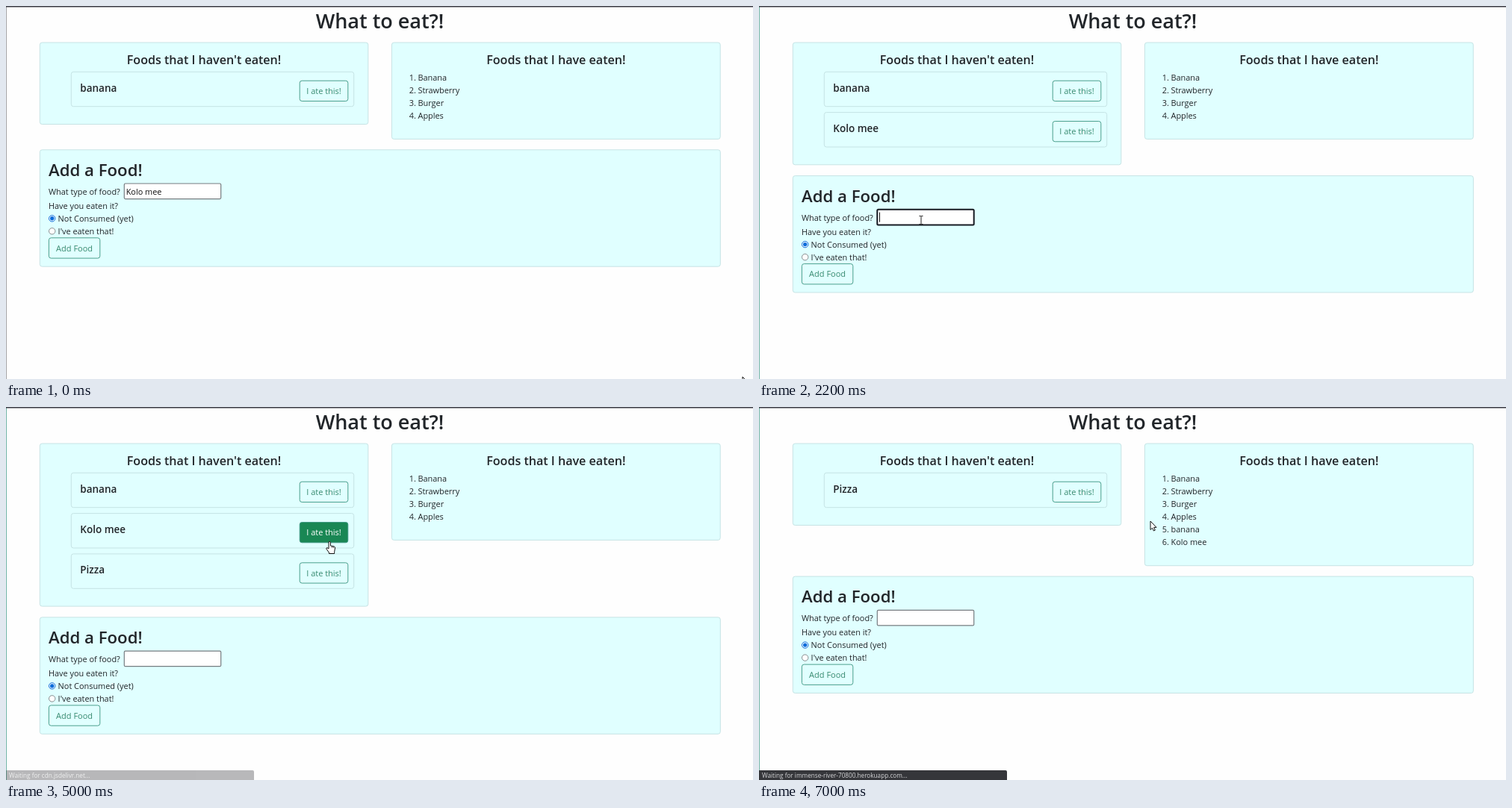
Animation, 1000 px wide and 500 px high, one loop 7.1 s. Source, as an HTML page:

```html
<!DOCTYPE html>
<html lang="en">
<head>
<meta charset="utf-8">
<title>What to eat?!</title>
<style>
  html, body { margin: 0; width: 100%; height: 100%; overflow: hidden; background: #fefefe; }
  svg { display: block; width: 1000px; height: 500px; font-family: "Open Sans", "Noto Sans", sans-serif; cursor: default; }
</style>
</head>
<body>
<svg id="stage" viewBox="0 0 1000 500"></svg>
<script>
const LOOP = 7100, STEP = 100;
const INK = '#212529', GREEN = '#198754', CARD = '#e0ffff', EDGE = '#c2e0e1';
const BODY = 10.9, ITEM_STEP = 54.3, LINE = 17.15;
const stage = document.getElementById('stage');
const ruler = document.createElement('canvas').getContext('2d');
ruler.font = `${BODY}px "Open Sans", "Noto Sans", sans-serif`;

// Each page the server returns, from its start time
const pages = [
  { from: 0, todo: ['banana'], done: [] },
  { from: 1300, todo: ['banana', 'Kolo mee'], done: [] },
  { from: 4800, todo: ['banana', 'Kolo mee', 'Pizza'], done: [] },
  { from: 5500, todo: ['banana', 'Pizza'], done: ['Kolo mee'] },
  { from: 6600, todo: ['Pizza'], done: ['banana', 'Kolo mee'] }
];
const eaten = ['Banana', 'Strawberry', 'Burger', 'Apples'];

// Pointer stops: time, x, y
const stops = [
  [0, 986, 497], [800, 93, 326], [1000, 93, 326], [1600, 218, 254],
  [2100, 217, 287], [3700, 217, 287], [4000, 96, 362], [4200, 96, 362],
  [4500, 410, 181], [4700, 433, 180], [5300, 433, 180], [5700, 512, 121],
  [5800, 512, 121], [6200, 428, 117], [6400, 428, 117], [6900, 524, 153], [LOOP, 524, 153]
];

const HOST = 'immense-river-70800.herokuapp.com', CDN = 'cdn.jsdelivr.net';
// Status bar: start, end, host, opacity
const statuses = [
  [1000, 1900, HOST, 1], [1900, 2100, CDN, 1], [2100, 2200, CDN, .35],
  [4600, 4900, HOST, 1], [4900, 5000, CDN, 1], [5000, 5100, CDN, .35],
  [5300, 5900, HOST, 1], [5900, 6000, CDN, 1], [6000, 6100, CDN, .35],
  [6400, LOOP, HOST, 1]
];

const text = (x, y, str, size = BODY, weight = 400, fill = INK, anchor = 'start') =>
  `<text x="${x}" y="${y}" font-size="${size}" font-weight="${weight}" fill="${fill}" text-anchor="${anchor}">${str}</text>`;
const box = (x, y, w, h, fill, stroke, line = .9, r = 3) =>
  `<rect x="${x}" y="${y}" width="${w}" height="${h}" rx="${r}" fill="${fill}" stroke="${stroke}" stroke-width="${line}"/>`;
const card = (x, y, w, h) => box(x, y, w, h, CARD, EDGE);
const inside = (p, x, y, w, h) => p.x >= x && p.x <= x + w && p.y >= y && p.y <= y + h;

function pointerAt(t) {
  const i = stops.findIndex(s => s[0] > t);
  const [t0, x0, y0] = stops[i - 1], [t1, x1, y1] = stops[i];
  const u = (t - t0) / (t1 - t0), k = u * u * (3 - 2 * u);
  return { x: x0 + (x1 - x0) * k, y: y0 + (y1 - y0) * k, kind: 'arrow' };
}

function button(p, x, y, w, label, focused) {
  const hover = inside(p, x, y, w, 26);
  if (hover) p.kind = 'hand';
  return (focused ? box(x - 1.5, y - 1.5, w + 3, 30.3, 'none', '#7fc0a4', 3.4, 4) : '') +
    box(x, y, w, 27.3, hover ? GREEN : CARD, focused ? '#146c50' : '#3c9580') +
    text(x + w / 2, y + 17.7, label, 11, 400, hover ? '#fff' : '#388a70', 'middle');
}

function radio(y, label, checked) {
  return `<circle cx="61.7" cy="${y}" r="4.2" fill="#fff" stroke="${checked ? '#0b6ddb' : '#858b8d'}"/>` +
    (checked ? `<circle cx="61.7" cy="${y}" r="2.7" fill="#0b6ddb"/>` : '') +
    text(69.6, y + 4.2, label);
}

function typed(t) {
  if (t < 1300) return 'Kolo mee';
  if (t < 3000 || t >= 4800) return '';
  return 'Pizza'.slice(0, [1, 2, 2, 3, 4][(t - 3000) / STEP] || 5);
}

function form(t, p, top) {
  const value = typed(t), focused = t >= 2200 && t < 4100;
  const sent = t >= 900 && t < 1300 || t >= 4100 && t < 4800;
  if (inside(p, 158, top + 45, 130, 21)) p.kind = 'beam';
  const caret = 161.5 + ruler.measureText(value).width;
  return card(45.3, top, 911, 156.4) +
    text(57, top + 35, 'Add a Food!', 22.2, 600) +
    text(57, top + 60, 'What type of food?') +
    box(158.3, top + 45.2, 129.4, 20.6, '#fff', focused ? '#161a22' : '#767c80', focused ? 2 : 1.2, 1.5) +
    text(160.7, top + 60, value, BODY, 400, '#111') +
    (focused ? `<path d="M${caret} ${top + 49}v13" stroke="#111"/>` : '') +
    text(57, top + 79, 'Have you eaten it?') +
    radio(top + 92, 'Not Consumed (yet)', true) +
    radio(top + 109, "I've eaten that!", false) +
    button(p, 57.4, top + 118, 68.4, 'Add Food', sent);
}

function item(p, name, i) {
  const y = 88.3 + i * ITEM_STEP;
  return box(87.3, y, 378.4, 46.4, 'none', EDGE) +
    text(99.3, y + 26.2, name, 13.5, 600) +
    button(p, 393.2, y + 11.9, 64.6, 'I ate this!');
}

function status(t) {
  const now = statuses.find(([from, to]) => t >= from && t < to);
  if (!now) return '';
  return `<g opacity="${now[3]}"><path d="M0 500V487H330q2 0 2 2V500z" fill="#35363a"/>` +
    text(4, 497, `Waiting for ${now[2]}...`, 8.2, 400, '#d5d6d8') + '</g>';
}

const shapes = {
  arrow: '<path d="M0 0V11.5L2.6 9.2L4.4 13L6.3 12.1L4.6 8.4H8z" fill="#fff" stroke="#111"/>',
  beam: '<path d="M-2.5-5.5h2l.5.5.5-.5h2M0-5V5M-2.5 5.5h2l.5-.5.5.5h2" fill="none" stroke="#222"/>',
  hand: '<path d="M-1 1q1.2-1.4 2.4 0V6l5 1q1.2.4 1.1 2L6.6 14.5V16.5H-.6V15L-4 10.4q-.7-1.7 1-1.7L-1 10z" fill="#fff" stroke="#111"/><path d="M3.5 6.5V9M5.5 7V9" stroke="#111" stroke-width=".7"/>'
};

function draw(t) {
  const page = pages.findLast(q => t >= q.from);
  const p = pointerAt(t), done = eaten.concat(page.done);
  const leftHeight = 55.2 + ITEM_STEP * page.todo.length;
  const rightHeight = 60.8 + LINE * done.length;
  stage.innerHTML =
    `<path d="M.5 0V500" stroke="${t ? '#73b5a8' : '#a5a5a8'}"/><path d="M0 .5H1000" stroke="#3b3b45" stroke-width="1.8"/>` +
    text(500.5, 30, 'What to eat?!', 27, 600, INK, 'middle') +
    card(45.3, 49, 439.5, leftHeight) +
    text(265, 78, "Foods that I haven't eaten!", 16.1, 600, INK, 'middle') +
    page.todo.map((name, i) => item(p, name, i)).join('') +
    card(516.4, 49, 439.8, rightHeight) +
    text(736.3, 78, 'Foods that I have eaten!', 16.1, 600, INK, 'middle') +
    done.map((name, i) => text(549, 99.6 + i * LINE, i + 1 + '.', BODY, 400, INK, 'end') +
      text(551.5, 99.6 + i * LINE, name)).join('') +
    form(t, p, 63.8 + Math.max(leftHeight, rightHeight - .4)) +
    status(t) +
    `<g transform="translate(${p.x} ${p.y})">${shapes[p.kind]}</g>`;
}

let shown = -1;
function tick() {
  const t = Math.floor(performance.now() % LOOP / STEP) * STEP;
  if (t !== shown) draw(shown = t);
  requestAnimationFrame(tick);
}
tick();
</script>
</body>
</html>
```
